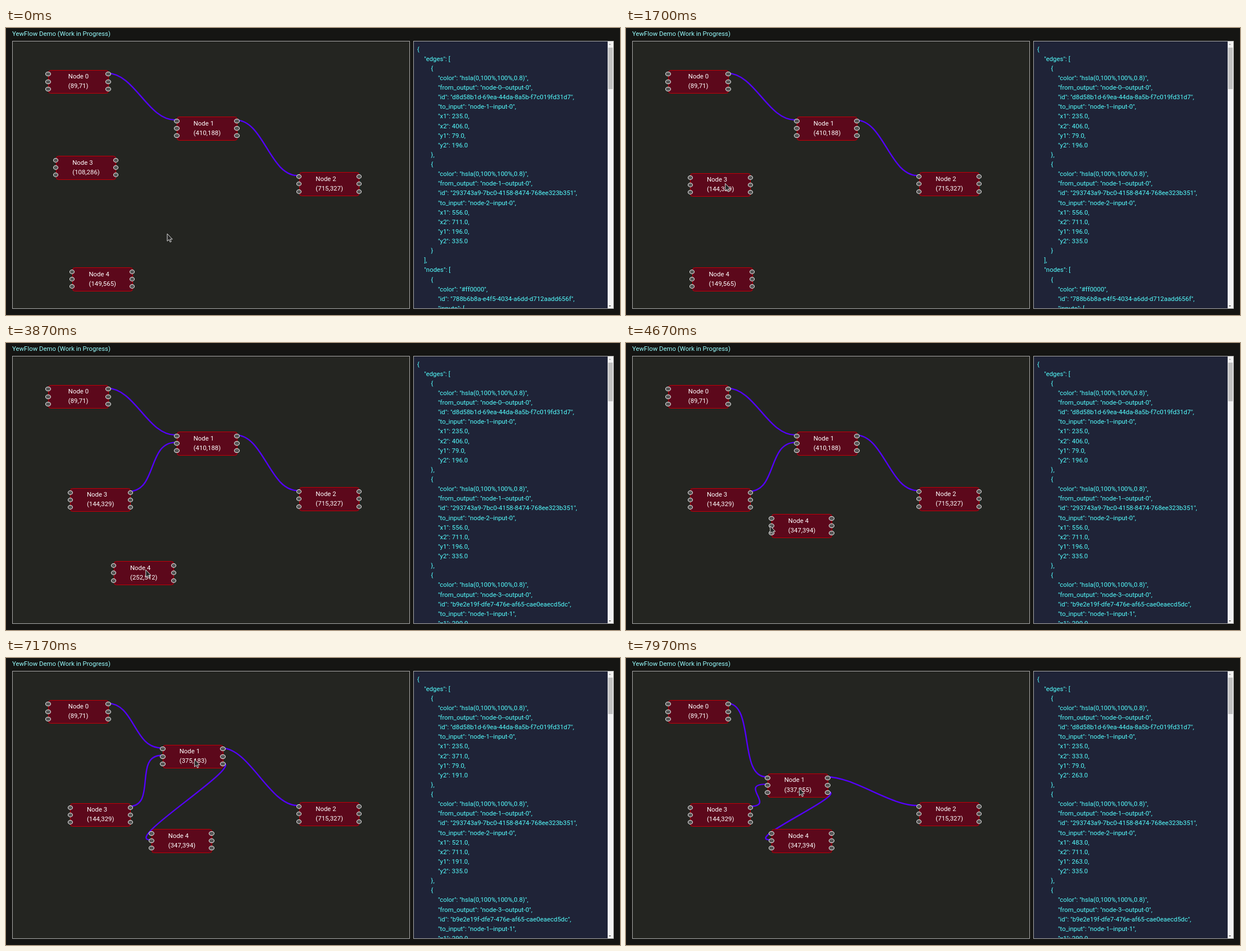
Write an HTML page that moves like this. It is 1093x512 px and loops after 8000 ms.

```html
<!DOCTYPE html>
<html lang="en">
<head>
<meta charset="utf-8">
<title>YewFlow Demo</title>
<style>
  html, body { margin: 0; width: 100%; height: 100%; overflow: hidden; background: #151513; }
  body { position: relative; font: 11.4px/17.12px Roboto, "Open Sans", sans-serif; }
  body * { position: absolute; box-sizing: border-box; margin: 0; }
  h1 { left: 11px; top: 2.3px; font: inherit; color: #9ff; white-space: nowrap; }
  .panel { top: 23px; height: 478px; border: 1px solid #aaa; overflow: hidden; }
  #flow { left: 11px; width: 708px; background: #242521; }
  #side { left: 725px; width: 357px; background: #1f2337; }
  #json { left: 6px; top: 5.6px; font: inherit; color: #5ff; tab-size: 12.3px; white-space: pre; }
  #bar { right: 0; top: 0; width: 10.5px; height: 476px; background: #f1f1f1; }
  #thumb { left: 1.4px; top: 10.5px; width: 7.7px; background: #c1c1c1; }
  #bar i { left: 2.7px; border: 2.6px solid transparent; }
  #bar #up { top: 1.5px; border-bottom-color: #999; }
  #bar #down { bottom: 1.5px; border-top-color: #444; }
  svg { left: 0; top: 0; width: 1093px; height: 512px; }
  #edges { fill: none; stroke: #50f; stroke-width: 2.4; }
  #cursor { fill: #262626; stroke: #ddd; stroke-linejoin: round; }
  .node { width: 107.5px; height: 42.5px; border: 1.5px solid #c00008; border-radius: 4.5px;
          background: #5c081b; color: #fff; }
  .node p { left: 50%; top: 2.4px; transform: translateX(-50%); white-space: pre; }
  .node b { width: 9.2px; height: 8px; border: 1.4px solid #eee; border-radius: 50%; background: #555; }
</style>
</head>
<body>
<h1>YewFlow Demo (Work in Progress)</h1>
<div id="flow" class="panel"></div>
<div id="side" class="panel">
  <pre id="json"></pre>
  <div id="bar"><div id="thumb"></div><i id="up"></i><i id="down"></i></div>
</div>
<svg><g id="edges"></g></svg>
<div id="nodes"></div>
<svg><path id="cursor" d="M0 0V13.2L3.1 10.5L5.2 15L7.2 14L5.2 9.8H9.2Z"/></svg>
<script>
const LOOP = 8000, SCALE = 0.7135, PULL = 50;
const $ = id => document.getElementById(id);
const pt = (x, y) => ({ x, y });
const near = (p, dx, dy) => pt(p.x + dx, p.y + dy);

// Flow coordinates to stage pixels
const corner = p => pt(12 + SCALE * p.x, 24.3 + SCALE * p.y);
const output = (p, i) => corner(near(p, 146, 8 + 18.5 * i));
const input = (p, i) => corner(near(p, -4, 8 + 18.5 * i));

function ease(u) {
  u = Math.min(1, Math.max(0, u));
  return u * u * (3 - 2 * u);
}

// Follows legs of [start time, end time, goal]
function travel(home, legs, t) {
  return legs.reduce((p, [start, end, goal]) => {
    const u = ease((t - start) / (end - start));
    return pt(p.x + (goal.x - p.x) * u, p.y + (goal.y - p.y) * u);
  }, home);
}

const nodes = [
  { home: pt(89, 71), legs: [] },
  { home: pt(410, 188), legs: [[7000, 7170, pt(375, 183)], [7170, 7430, pt(342, 189)], [7700, 7970, pt(337, 255)]] },
  { home: pt(715, 327), legs: [] },
  { home: pt(108, 286), legs: [[720, 1000, pt(160, 293)], [1000, 1100, pt(159, 327)], [1100, 1400, pt(144, 329)]] },
  { home: pt(149, 565), legs: [[3730, 3870, pt(252, 512)], [3870, 4130, pt(347, 394)]] }
];

// "drawn" is when dragging begins, "joined" when the loose end is dropped
const links = [
  { from: 0, out: 0, to: 1, in: 0, drawn: 0, joined: 0, id: "d8d58b1d-69ea-44da-8a5b-f7c019fd31d7" },
  { from: 1, out: 0, to: 2, in: 0, drawn: 0, joined: 0, id: "293743a9-7bc0-4158-8474-768ee323b351" },
  { from: 3, out: 0, to: 1, in: 1, drawn: 2100, joined: 2930, id: "b9e2e19f-dfe7-476e-af65-cae0eaecd5dc" },
  { from: 1, out: 2, to: 4, in: 1, drawn: 4970, joined: 6370, backward: true }
];

// A pointer resting on a node's grip moves along with that node
function pointer(pos, t) {
  const grip = (i, dx, dy) => near(corner(pos[i]), dx, dy);
  return travel(pt(287, 367), [
    [300, 650, grip(3, 14, 31)],
    [1500, 1900, near(output(pos[3], 0), 5, 0)],
    [2100, 2620, near(input(pos[1], 1), -7, 0)],
    [2930, 3430, pt(230, 440)],
    [3630, 3730, grip(4, 57, 15)],
    [4270, 4470, pt(283, 327)],
    [4650, 4670, near(input(pos[4], 1), 0, 2)],
    [4970, 5600, near(output(pos[1], 2), -3, 1)],
    [5800, 6170, near(output(pos[1], 2), 6, 2)],
    [6370, 6770, grip(1, 56, 26)]
  ], t);
}

function curve(a, b) {
  return `<path d="M${a.x} ${a.y}C${a.x + PULL} ${a.y} ${b.x - PULL} ${b.y} ${b.x} ${b.y}"/>`;
}

function linkText(link, pos, t) {
  const num = v => v.toFixed(1), a = pos[link.from], b = pos[link.to];
  return `\t\t{
\t\t\t"color": "hsla(0,100%,100%,0.8)",
\t\t\t"from_output": "node-${link.from}--output-${link.out}",
\t\t\t"id": "${link.id}",
\t\t\t"to_input": ${t < link.joined ? "null" : `"node-${link.to}--input-${link.in}"`},
\t\t\t"x1": ${num(a.x + 146)},
\t\t\t"x2": ${num(b.x - 4)},
\t\t\t"y1": ${num(a.y + 8)},
\t\t\t"y2": ${num(b.y + 8)}
\t\t}`;
}

// Only the rows that fit in the panel
function jsonText(shown, pos, t) {
  const rows = shown.slice(0, 3).map(link => linkText(link, pos, t));
  return `{\n\t"edges": [\n${rows.join(",\n")}
\t],
\t"nodes": [
\t\t{
\t\t\t"color": "#ff0000",
\t\t\t"id": "788b6b8a-e4f5-4034-a6dd-d712aadd656f",
\t\t\t"inputs": [`;
}

function setText(el, text) {
  if (el.textContent !== text) el.textContent = text;
}

const boxes = nodes.map(() => {
  const box = document.createElement("div");
  box.className = "node";
  box.innerHTML = "<p></p>";
  for (let i = 0; i < 6; i++) {
    const x = (i % 2) * 107 - 5.8, y = 2.7 + 13.2 * (i >> 1);
    box.innerHTML += `<b style="left:${x}px;top:${y}px"></b>`;
  }
  return $("nodes").appendChild(box);
});

function draw(t) {
  const pos = nodes.map(({ home, legs }) => {
    const p = travel(home, legs, t);
    return pt(Math.round(p.x), Math.round(p.y));
  });
  const tip = pointer(pos, t);
  const shown = links.filter(link => t >= link.drawn);

  boxes.forEach((box, i) => {
    const { x, y } = corner(pos[i]);
    box.style.left = x - 0.3 + "px";
    box.style.top = y - 0.2 + "px";
    setText(box.firstChild, `Node ${i}\n(${pos[i].x},${pos[i].y})`);
  });

  $("edges").innerHTML = shown.map(link => {
    const a = output(pos[link.from], link.out), b = input(pos[link.to], link.in);
    if (t >= link.joined) return curve(a, b);
    return link.backward ? curve(tip, b) : curve(a, tip);
  }).join("");

  setText($("json"), jsonText(shown, pos, t));
  $("thumb").style.height = 12000 / (142 + 10 * shown.length) + "px";
  $("cursor").setAttribute("transform", `translate(${tip.x} ${tip.y})`);
}

function frame(now) {
  draw(now % LOOP);
  requestAnimationFrame(frame);
}
draw(0);
requestAnimationFrame(frame);
</script>
</body>
</html>
```
